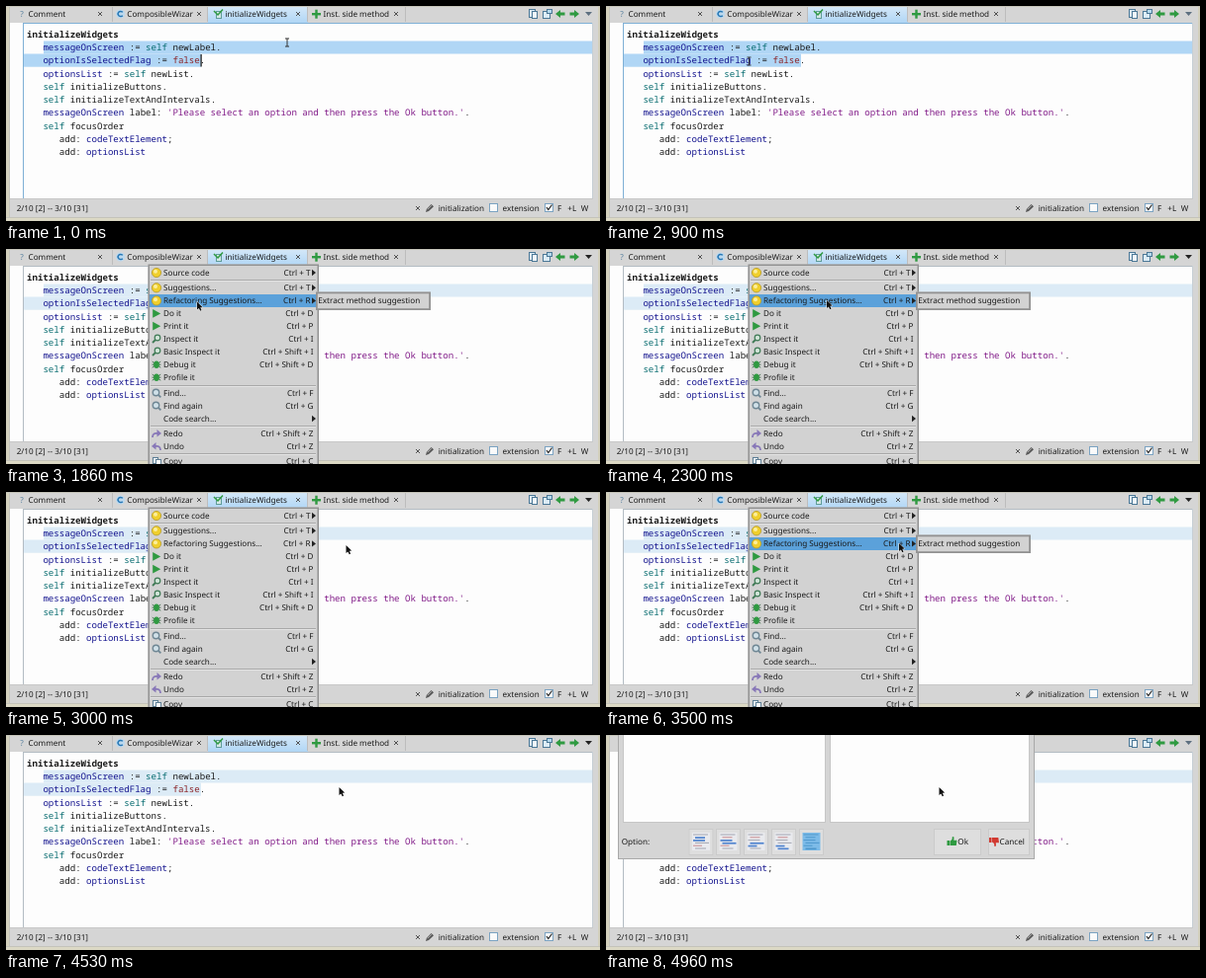
Recreate the animation shown at these times as an HTML page with a canvas. Size 600x218 px, loop 5 s.

```html
<!DOCTYPE html>
<html lang="en">
<head>
<meta charset="utf-8">
<title>Code editor</title>
<style>
html, body { margin: 0; width: 100%; height: 100%; overflow: hidden; background: #d6d6d6; }
canvas { display: block; width: 600px; height: 218px; }
</style>
</head>
<body>
<canvas id="stage"></canvas>
<script>
const W = 600, H = 218, LOOP = 5000;
const MENU_OPEN = 1180, CLICK = 4420, DIALOG_OPEN = 4600;
const canvas = document.getElementById('stage');
const ctx = canvas.getContext('2d');
const ratio = window.devicePixelRatio || 1;
canvas.width = W * ratio;
canvas.height = H * ratio;

const UI = '8.15px "Noto Sans", "Open Sans", sans-serif';
const MONO = '9.1px "Noto Sans Mono", "DejaVu Sans Mono", monospace';
const CHAR = 5.46, LINE = 13.22, LEFT = 21, TOP = 29;
const GRAY = '#d5d5d5', INK = '#1a1a1a', BLUE = '#5ba1da', GREEN = '#2f9a41';
const SELECTED = '#b0d6f5', FADED = '#dcebf6', EDGE = '#929292';

const code = [
  'initializeWidgets',
  '   messageOnScreen := self newLabel.',
  '   optionIsSelectedFlag := false.',
  '   optionsList := self newList.',
  '   self initializeButtons.',
  '   self initializeTextAndIntervals.',
  "   messageOnScreen label: 'Please select an option and then press the Ok button.'.",
  '   self focusOrder',
  '      add: codeTextElement;',
  '      add: optionsList'
];
const fields = ['messageOnScreen', 'optionIsSelectedFlag', 'optionsList', 'codeTextElement'];

// label, centre y, shortcut, icon, has submenu
const menu = [
  ['Source code', 24, 'Ctrl + T', 'ball', true],
  ['Suggestions...', 39.3, 'Ctrl + T', 'ball', true],
  ['Refactoring Suggestions...', 52.4, 'Ctrl + R', 'ball', true],
  ['Do it', 65.4, 'Ctrl + D', 'play'],
  ['Print it', 78.2, 'Ctrl + P', 'play'],
  ['Inspect it', 91, 'Ctrl + I', 'lens'],
  ['Basic Inspect it', 104, 'Ctrl + Shift + I', 'lens'],
  ['Debug it', 117.2, 'Ctrl + Shift + D', 'bug'],
  ['Profile it', 130.2, '', 'bug'],
  ['Find...', 146, 'Ctrl + F', 'find'],
  ['Find again', 159, 'Ctrl + G', 'find'],
  ['Code search...', 172, '', '', true],
  ['Redo', 187, 'Ctrl + Shift + Z', 'redo'],
  ['Undo', 200, 'Ctrl + Z', 'undo'],
  ['Copy', 215, 'Ctrl + C', 'copy']
];

// pointer stops: time, x, y
const path = [
  [0, 284, 37], [180, 284, 37], [780, 144.5, 56], [1560, 144.5, 56],
  [2080, 223, 52], [2500, 223, 52], [2900, 343.5, 54], [3080, 343.5, 54],
  [3380, 296, 52], [3520, 296, 52], [3920, 336.5, 53], [5000, 336.5, 53]
];

function pointer(t) {
  let i = 1;
  while (i < path.length - 1 && path[i][0] <= t) i++;
  const a = path[i - 1], b = path[i];
  const k = Math.min(1, Math.max(0, (t - a[0]) / (b[0] - a[0])));
  const e = k * k * (3 - 2 * k);
  return { x: a[1] + (b[1] - a[1]) * e, y: a[2] + (b[2] - a[2]) * e };
}

function box(x, y, w, h, fill, stroke, line = 1) {
  if (fill) { ctx.fillStyle = fill; ctx.fillRect(x, y, w, h); }
  if (stroke) {
    ctx.strokeStyle = stroke;
    ctx.lineWidth = line;
    ctx.strokeRect(x + line / 2, y + line / 2, w - line, h - line);
  }
}

function poly(points, fill, stroke, width = 1) {
  ctx.beginPath();
  for (let i = 0; i < points.length; i += 2) ctx.lineTo(points[i], points[i + 1]);
  if (fill) { ctx.closePath(); ctx.fillStyle = fill; ctx.fill(); }
  if (stroke) { ctx.strokeStyle = stroke; ctx.lineWidth = width; ctx.stroke(); }
}

function disc(x, y, r, fill, stroke, width = 1) {
  ctx.beginPath();
  ctx.arc(x, y, r, 0, Math.PI * 2);
  if (fill) { ctx.fillStyle = fill; ctx.fill(); }
  if (stroke) { ctx.strokeStyle = stroke; ctx.lineWidth = width; ctx.stroke(); }
}

function label(str, x, y, color = INK, align = 'left') {
  ctx.font = UI;
  ctx.textAlign = align;
  ctx.fillStyle = color;
  ctx.fillText(str, x, y + 2.8);
}

function cross(x, y, r = 2) {
  poly([x - r, y - r, x + r, y + r], null, '#444', .9);
  poly([x - r, y + r, x + r, y - r], null, '#444', .9);
}

function arrow(x, y, dir) {
  const p = [-5, 0, 0, -4, 0, -1.5, 4.5, -1.5, 4.5, 1.5, 0, 1.5, 0, 4];
  poly(p.map((v, i) => i % 2 ? y + v : x + v * dir), GREEN);
}

function drawTabs() {
  box(0, 0, W, 17, GRAY);
  const glow = ctx.createLinearGradient(0, 0, 0, 17);
  glow.addColorStop(0, '#d5e8f8');
  glow.addColorStop(1, SELECTED);
  box(204, 0, 101, 17, glow);
  for (const x of [107, 203, 304, 403]) box(x, 0, 1, 16, '#bdbdbd');

  label('Comment', 22.5, 8);
  label('ComposibleWizar', 122.3, 8);
  label('initializeWidgets', 221.5, 8);
  label('Inst. side method', 320.5, 8);
  for (const x of [95, 195, 295, 394]) cross(x, 8);

  label('?', 16, 8, '#5a82a0', 'center');
  disc(115.5, 8, 4.5, '#bdd9ee');
  ctx.beginPath();
  ctx.arc(115.8, 8, 2.6, .7, 5.6);
  ctx.strokeStyle = '#2878b5';
  ctx.lineWidth = 1.5;
  ctx.stroke();
  box(212, 5, 6, 8, '#d5e8e6', '#5f9d98');
  poly([210, 5, 214, 9, 219, 3.5], null, GREEN, 1.5);
  box(309, 7, 9, 2.4, GREEN);
  box(312.3, 3.7, 2.4, 9, GREEN);
}

function drawTools() {
  box(528, 3, 7, 9, '#dcecf6', '#4c7896');
  box(531, 5, 6, 8, '#f2f8fc', '#4c7896');
  box(542, 5, 8, 8, '#dcecf6', '#4c7896');
  box(546, 3, 6, 5, '#b5d9ec', '#4c7896');
  arrow(560, 8, 1);
  arrow(574, 8, -1);
}

function tokenColor(token) {
  if (token[0] === "'") return '#811b88';
  if (token === 'self') return '#086c70';
  if (token === 'false') return '#8c2528';
  return fields.includes(token) ? '#13138e' : INK;
}

function drawCode(t) {
  const focused = t < MENU_OPEN;
  const shade = focused ? SELECTED : FADED;
  const rim = focused ? '#7fb0d6' : '#b3bcc3';
  box(4, 17, 589, 179, '#fdfdfd');
  box(38, 35.5, 555, 13, shade);
  box(18, 48.5, 179, 13.2, shade);
  box(17, 17, 1, 179, rim);
  box(17, 17, 576, 1, rim);
  box(592, 17, 1, 179, '#c6cfd5');
  box(4, 195, 589, 1, '#c8c8c8');

  ctx.textAlign = 'left';
  code.forEach((line, row) => {
    ctx.font = (row ? '' : 'bold ') + MONO;
    for (const m of line.matchAll(/'[^']*'|[A-Za-z]+:?|:=|\S/g)) {
      ctx.fillStyle = tokenColor(m[0]);
      ctx.fillText(m[0], LEFT + m.index * CHAR, TOP + row * LINE + 3);
    }
  });
  if (focused && t % 1000 < 500) box(196.5, 49, 1.2, 12.5, '#111');
}

function checkbox(x, y, on) {
  box(x, y, 9, 9, '#fafafa', '#7ba3c2');
  if (on) poly([x + 2, y + 4.2, x + 3.8, y + 6.5, x + 7.5, y + 1.5], null, '#222', 1.2);
}

function drawStatus() {
  box(0, 196, W, 22, GRAY);
  label('2/10 [2] -- 3/10 [31]', 10.7, 205);
  cross(416, 205);
  poly([424, 209, 424.8, 206, 429.5, 201, 432, 203.3, 427, 208], '#555');
  poly([425.8, 206.3, 430, 202.2], null, '#c8c8c8', .8);
  label('initialization', 436.7, 205);
  checkbox(488, 200, false);
  label('extension', 501.5, 205);
  checkbox(544, 200, true);
  label('F', 557, 205);
  label('+L', 567.3, 205);
  label('W', 580.7, 205);
}

function drawFrame() {
  box(0, 0, 3, H, '#d3d0bd');
  box(598, 0, 2, H, '#d3d0bd');
  box(3, 0, 1, H, '#c4c3ba');
  box(0, 0, W, 1, '#c9c8bd');
  box(0, 214, W, 1, '#c4c3ba');
  box(0, 215, W, 3, '#dcd9c5');
}

const icons = {
  ball(x, y) {
    disc(x, y, 4.6, '#f0cf2c', '#b79a25', .8);
    disc(x - 1, y - 1.2, 2, '#fbee9c');
  },
  play(x, y) { poly([x - 3.8, y - 4.4, x + 4.2, y, x - 3.8, y + 4.4], GREEN); },
  lens(x, y) {
    disc(x + 1, y - 1, 2.8, '#cfe3d6', '#3f7a55', 1.2);
    poly([x - 1, y + 1, x - 4, y + 4], null, '#3f7a55', 1.8);
  },
  bug(x, y) {
    for (const d of [-3, 3]) poly([x - 4.2, y + d, x + 4.2, y - d], null, '#3c6d48', 1);
    poly([x - 4.4, y, x + 4.4, y], null, '#3c6d48', 1);
    ctx.beginPath();
    ctx.ellipse(x, y, 2.8, 3.8, 0, 0, Math.PI * 2);
    ctx.fillStyle = GREEN;
    ctx.fill();
  },
  find(x, y) {
    disc(x - .5, y - .5, 3.2, '#cfe0e8', '#6f8794', 1.4);
    poly([x + 1.8, y + 1.8, x + 4.4, y + 4.4], null, '#6f8794', 1.8);
  },
  undo(x, y, dir = 1) {
    poly([x - 5 * dir, y, x - .5 * dir, y - 4, x - .5 * dir, y + 3.5], '#8878b8');
    ctx.beginPath();
    ctx.moveTo(x - dir, y);
    ctx.quadraticCurveTo(x + 4 * dir, y - .8, x + 4 * dir, y + 4);
    ctx.strokeStyle = '#8878b8';
    ctx.lineWidth = 1.8;
    ctx.stroke();
  },
  redo(x, y) { icons.undo(x, y, -1); },
  copy(x, y) {
    box(x - 4, y - 4, 6, 7, '#eaf2f7', '#5f7f95');
    box(x - 1, y - 2, 6, 7, '#fff', '#5f7f95');
  }
};

function drawMenu(t, p) {
  const outside = p.x > 314;
  const inSub = outside && t > 3380;
  const active = t > 1560 && (!outside || inSub);
  box(143.5, 15.5, 172.5, 206, '#d2d2d2', EDGE, 1.5);
  if (active) box(145, 46, 169, 13, BLUE);
  for (const y of [31, 138, 179, 207]) {
    box(146, y, 167, 1, '#a9a9a9');
    box(146, y + 1, 167, 1, '#e4e4e4');
  }
  for (const [name, y, keys, icon, more] of menu) {
    if (icon) icons[icon](152, y);
    label(name, 159, y);
    label(keys, more ? 307.5 : 310.5, y, INK, 'right');
    if (more) poly([309, y - 3.2, 313, y, 309, y + 3.2], '#222');
  }
  if (active && p.x > 150) {
    box(313, 43.5, 116, 18.5, '#d2d2d2', EDGE, 1.8);
    if (inSub) box(315, 46, 112, 13, BLUE);
    label('Extract method suggestion', 315.2, 52.4);
  }
}

function thumb(x, y, dir, color) {
  box(x - 5, y - (dir > 0 ? 1 : 4), 2.5, 5, color);
  const p = [-2, -.5, 0, -2, .4, -5, 2, -4.5, 1.8, -1.3, 5, -1.2, 4.3, 4, -2, 4];
  poly(p.map((v, i) => i % 2 ? y + v * dir : x + v), color);
}

function drawDialog() {
  box(12, -1, 421, 127, GRAY, '#a9a9a9');
  box(17, -1, 205, 90, '#fdfdfd', '#c6c6c6');
  box(226, -1, 202, 90, '#fdfdfd', '#c6c6c6');
  label('Option:', 15.7, 108.5);
  [96, 123.5, 151.5, 179.5, 207.5].forEach((x, i) => {
    box(x - 12.5, 95, 25, 27, '#dedede', '#cbcbcb');
    box(x - 9, 99, 18, 18, i === 4 ? '#7dbbe8' : '#e9eaee');
    for (let n = 0; n < 6; n++) {
      const marked = n === i + 1 || n === i + 2;
      const color = i === 4 ? '#4e97cc' : marked ? '#4f83cf' : n === 1 || n === 4 ? '#c98d91' : '#a4a7b3';
      box(x - 8 + n % 2 * 2, 100.5 + n * 2.8, 15 - n * 5 % 7, marked ? 1.7 : 1, color);
    }
  });
  box(331, 95, 48, 27, '#dedede', '#cbcbcb');
  thumb(349.5, 108, 1, GREEN);
  label('Ok', 355.3, 108.5);
  box(386, 95, 42, 27, '#dedede', '#cbcbcb');
  thumb(392, 108, -1, '#d13a32');
  label('Cancel', 397.6, 108.5);
}

function drawPointer(t, p) {
  const { x, y } = p;
  if (t < MENU_OPEN) {
    poly([x, y - 4, x, y + 4], null, '#333', 1);
    for (const d of [-4, 4]) poly([x - 2, y + d, x + 2, y + d], null, '#333', 1);
    return;
  }
  const shape = [0, 0, 0, 8, 1.9, 6.4, 3.2, 9.2, 4.6, 8.5, 3.3, 5.8, 5.7, 5.6, 0, 0];
  const at = shape.map((v, i) => v + (i % 2 ? y : x));
  poly(at, null, '#fff', 1);
  poly(at, '#111');
}

function draw(t) {
  const p = pointer(t);
  ctx.setTransform(ratio, 0, 0, ratio, 0, 0);
  ctx.textBaseline = 'alphabetic';
  ctx.textRendering = 'geometricPrecision';
  box(0, 0, W, H, GRAY);
  drawTabs();
  drawTools();
  poly([585, 6, 592, 6, 588.5, 10], t < DIALOG_OPEN && t >= MENU_OPEN ? '#222' : '#5d6f80');
  drawCode(t);
  drawStatus();
  drawFrame();
  if (t >= MENU_OPEN && t < CLICK) drawMenu(t, p);
  if (t >= DIALOG_OPEN) drawDialog();
  drawPointer(t, p);
}

const start = performance.now();
function tick() {
  draw((performance.now() - start) % LOOP);
  requestAnimationFrame(tick);
}
tick();
</script>
</body>
</html>
```
